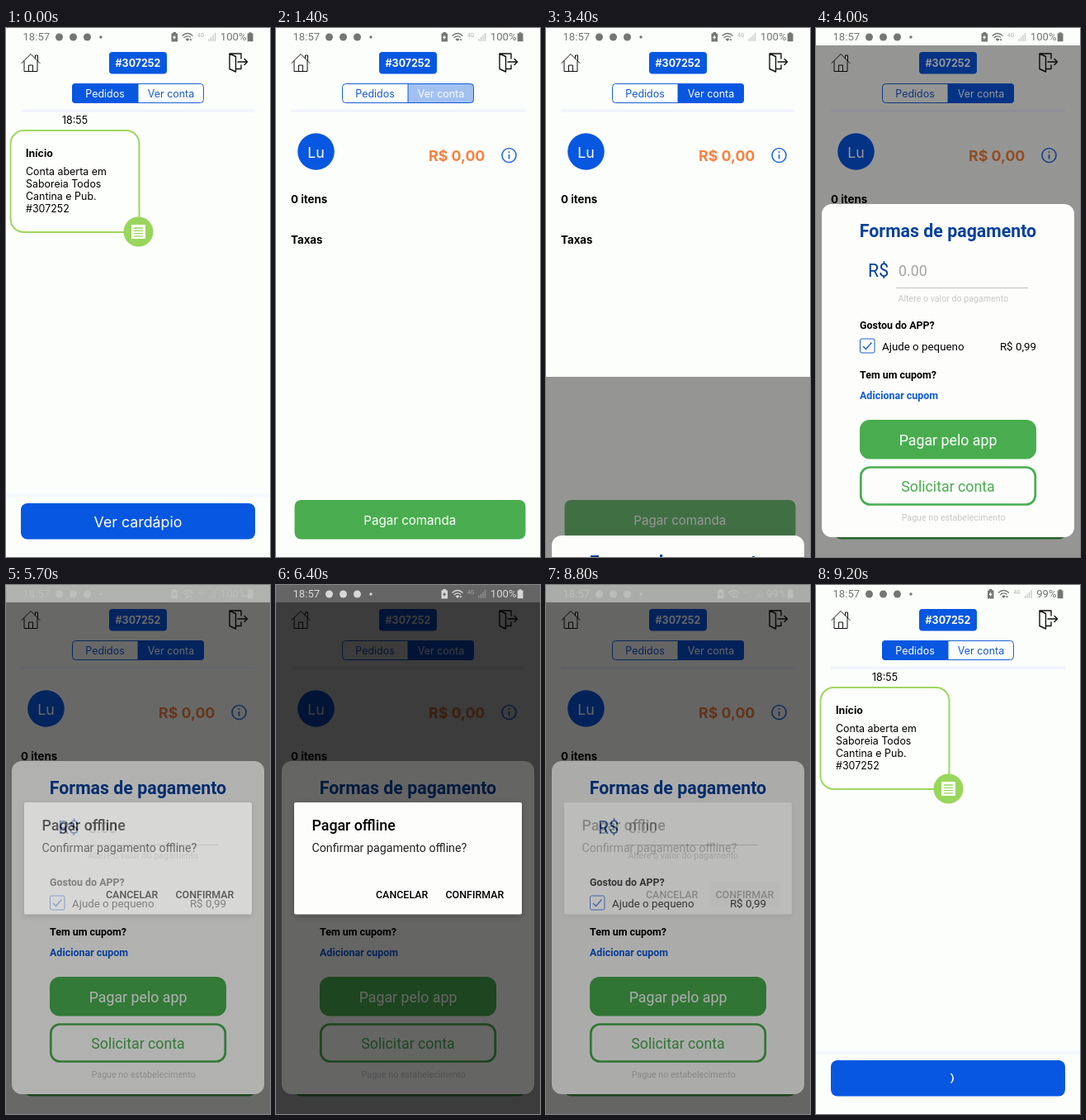
An HTML page for the animation above (9300 ms loop, 320 by 640 pixels).

```html
<!DOCTYPE html>
<html lang="pt-BR">
<head>
<meta charset="utf-8">
<title>Comanda</title>
<style>
html, body { margin: 0; width: 100%; height: 100%; overflow: hidden; background: #fcfefb; }
svg { display: block; width: 320px; height: 640px; }
text { font-family: Inter, sans-serif; font-size: 12.44px; white-space: pre; }
.rb text, text.rb { font-family: Roboto, sans-serif; }
.b { font-weight: 700; }
.m { font-weight: 500; }
.mid { text-anchor: middle; }
.ln { fill: none; stroke: #111; stroke-width: 1; stroke-linejoin: round; stroke-linecap: round; }
</style>
</head>
<body>
<svg viewBox="0 0 320 640" xmlns="http://www.w3.org/2000/svg">
  <rect width="320" height="640" fill="#fcfefb"/>

  <!-- header -->
  <g class="ln">
    <path d="M19 42.5L30 31.5L41 42.5M22 40V52.5H38V40M27.5 52.5V45H32.5V52.5M35.5 36.5V33H38.5V39.5"/>
    <path stroke-width="1.4" d="M271 31L278.5 34.5V53L271 49.5ZM271 31H285V37M285 45V49.5H278.5M281 41H292.5M289 37.5L292.5 41L289 44.5"/>
  </g>
  <rect x="125" y="29" width="70" height="26.5" rx="4" fill="#0757e1"/>
  <text class="b mid" x="160" y="47" fill="#fff">#307252</text>
  <rect x="18" y="98.5" width="284" height="3.5" fill="#f1f4fd"/>

  <!-- segmented control -->
  <rect x="80.5" y="67.5" width="159" height="23" rx="4" fill="#fcfefb" stroke="#1a5fd8"/>
  <path id="segL" d="M160.500 67V91H84a4 4 0 0 1-4-4V71a4 4 0 0 1 4-4Z" fill="#0757e1"/>
  <path id="segMid" d="M160 67V91" stroke="#1a5fd8"/>
  <text id="tabL" class="mid" x="120" y="84">Pedidos</text>
  <g id="segR">
    <path id="segRFill" d="M160 67V91H236a4 4 0 0 0 4-4V71a4 4 0 0 0-4-4Z" fill="#0757e1"/>
    <text id="tabR" class="mid" x="200" y="84">Ver conta</text>
  </g>

  <!-- orders -->
  <g id="orders">
    <text x="68" y="115.700">18:55</text>
    <rect x="5.500" y="124" width="156" height="123" rx="16" fill="#fdfffc" stroke="#9fd75f" stroke-width="2"/>
    <text class="b" x="24" y="156">Início</text>
    <text x="24" y="178">Conta aberta em</text>
    <text x="24" y="193">Saboreia Todos</text>
    <text x="24" y="208">Cantina e Pub.</text>
    <text x="24" y="223">#307252</text>
    <circle cx="160.500" cy="246.500" r="18" fill="#98d65c"/>
    <path d="M152 238H169V255H152Z" fill="#fff"/>
    <path d="M155 242H166M155 245.300H166M155 248.600H166M155 251.800H166" stroke="#98d65c" stroke-width="1.300"/>
    <rect y="563" width="320" height="5" fill="#f5f9fe"/>
    <rect x="18" y="575" width="284" height="43.500" rx="8" fill="#0757e1"/>
    <text id="menu" class="mid" x="160" y="603.500" fill="#fff" style="font-size:17.78px">Ver cardápio</text>
    <path id="spin" d="M163.500 591A7.500 7.500 0 0 1 163.500 602.500" fill="none" stroke="#fff" stroke-width="1.600"/>
  </g>

  <!-- bill -->
  <g id="bill">
    <circle cx="48.500" cy="149.500" r="22.300" fill="#0757e1"/>
    <text class="mid" x="48.500" y="156.500" fill="#fff" style="font-size:17.78px">Lu</text>
    <text class="b" x="185" y="161" fill="#f9803f" style="font-size:17.78px">R$ 0,00</text>
    <circle cx="282.500" cy="154" r="8.500" fill="none" stroke="#2f70e4" stroke-width="1.700"/>
    <path d="M282.500 149.300V151M282.500 153V158.500" stroke="#2f70e4" stroke-width="1.800"/>
    <text class="b" x="18" y="212" style="font-size:13.33px">0 itens</text>
    <text class="b" x="18" y="261" style="font-size:13.33px">Taxas</text>
    <g id="pay">
      <rect x="22.500" y="571" width="280" height="47.500" rx="8" fill="#49ad4f"/>
      <text class="mid" x="162.300" y="600.500" fill="#fff" style="font-size:15.11px">Pagar comanda</text>
    </g>
  </g>

  <!-- payment sheet -->
  <g id="sheet" class="rb">
    <rect y="21" width="320" height="619" opacity=".41"/>
    <rect x="7" y="213" width="306" height="403" rx="12" fill="#fdfefc"/>
    <text class="b mid" x="160" y="253" fill="#07409c" style="font-size:21.33px">Formas de pagamento</text>
    <text x="63" y="301" fill="#07409c" style="font-size:21.33px">R$</text>
    <text x="100" y="300" fill="#a3a5a3" style="font-size:17.78px">0.00</text>
    <path d="M97 314.500H257" stroke="#bfc1bf"/>
    <text x="99.500" y="330.500" fill="#c6c8c6" style="font-size:10.67px">Altere o valor do pagamento</text>
    <text class="b" x="53" y="363.500">Gostou do APP?</text>
    <rect x="53.500" y="376" width="17.500" height="17" rx="2" fill="none" stroke="#1b5ad0"/>
    <path d="M57 385L60.500 388.500L67.500 380.500" fill="none" stroke="#1b5ad0" stroke-width="1.400"/>
    <text x="80" y="389.500" style="font-size:13.33px">Ajude o pequeno</text>
    <text x="267" y="389.500" text-anchor="end" style="font-size:13.33px">R$ 0,99</text>
    <text class="b" x="53" y="424">Tem um cupom?</text>
    <text class="b" x="53" y="449" fill="#0b58d8">Adicionar cupom</text>
    <rect x="53" y="474" width="214" height="47.500" rx="12" fill="#49ad4f"/>
    <text class="mid" x="160" y="504.500" fill="#fff" style="font-size:17.78px">Pagar pelo app</text>
    <rect x="54.300" y="531.500" width="211.500" height="45" rx="11" fill="none" stroke="#49ad4f" stroke-width="2.700"/>
    <text class="mid" x="160" y="560.500" fill="#49ad4f" style="font-size:17.78px">Solicitar conta</text>
    <text class="mid" x="166.700" y="596" fill="#c6c8c6" style="font-size:10.67px">Pague no estabelecimento</text>
  </g>

  <rect id="dim" width="320" height="640"/>

  <!-- status bar -->
  <g id="status" class="rb">
    <text x="20.500" y="15" style="font-size:13.1px">18:57</text>
    <circle cx="64.500" cy="11" r="4.500"/>
    <circle cx="81.500" cy="11" r="4.500"/>
    <circle cx="98.500" cy="11" r="4.500"/>
    <circle cx="115" cy="11" r="1.700"/>
    <g id="signals">
      <path fill-rule="evenodd" d="M202.500 5H206V6.500H208V16.500H200.500V6.500H202.500ZM204.200 8.500L202 12H203.500V14L206.500 10.800H204.800Z"/>
      <path d="M213.500 9.500Q220 3.500 226.500 9.500M215.500 12Q220 8 224 11.500" fill="none" stroke="currentColor" stroke-width="1.300"/>
      <path d="M217.500 13.500Q220 11.500 222.500 13.500L220 16Z"/>
      <path d="M224 12.500L225.500 15H222.500Z"/>
      <text x="232" y="10.500" opacity=".6" style="font-size:6.500px">4G</text>
      <path d="M246 13V16M248.500 11V16M251 8.500V16M253.500 6V16" stroke="currentColor" stroke-width="1.300" opacity=".4"/>
    </g>
    <text id="charge" x="291.500" y="15" text-anchor="end" style="font-size:13.1px"></text>
    <path d="M294.500 5.200H297.500V6.500H299.500V16.300H292.700V6.500H294.500Z"/>
  </g>

  <!-- confirm dialog -->
  <g id="dialog" class="rb">
    <rect x="22" y="263" width="276" height="135.500" rx="2" fill="#fdfefc" style="filter:drop-shadow(0 2px 3px rgba(0,0,0,.25))"/>
    <rect id="ripple" x="199" y="359" width="85" height="30" rx="2" opacity=".05"/>
    <text class="m" x="43.500" y="297" style="font-size:17.78px">Pagar offline</text>
    <text x="43.500" y="323" fill="#222" style="font-size:14.22px">Confirmar pagamento offline?</text>
    <text class="m" x="121" y="379">CANCELAR</text>
    <text class="m" x="205.500" y="379">CONFIRMAR</text>
  </g>
</svg>
<script>
const LOOP = 9300, STEP = 100, TRAVEL = 619, DIM = 0.6;
const el = id => document.getElementById(id);
const set = (id, name, value) => el(id).setAttribute(name, value);
const show = (id, on) => set(id, 'visibility', on ? 'visible' : 'hidden');
const ramp = (t, a, b) => Math.min(1, Math.max(0, (t - a) / (b - a)));

function draw(t) {
  // tabs
  const onBill = t >= 1300 && t < 9200;
  show('orders', !onBill);
  show('bill', onBill);
  show('segL', !onBill);
  show('segRFill', onBill);
  show('segMid', onBill);
  set('tabL', 'fill', onBill ? '#1559d4' : '#fff');
  set('tabR', 'fill', onBill ? '#fff' : '#1559d4');
  set('segR', 'opacity', onBill ? 0.2 + 0.8 * ramp(t, 1340, 1640) : 1);

  const loading = t >= 9200;
  show('menu', !loading);
  show('spin', loading);

  // pressed button recovers while the sheet opens
  set('pay', 'opacity', t < 3200 ? 1 : 0.6 + 0.4 * ramp(t, 3200, 3600));

  // sheet slides up decelerating, leaves accelerating
  const up = (1 - ramp(t, 3322, 3722)) ** 2;
  const down = ramp(t, 9000, 9200) ** 2;
  set('sheet', 'transform', `translate(0 ${Math.round(TRAVEL * Math.max(up, down))})`);
  show('sheet', t > 3322 && t < 9200);

  // dialog fades over a dimmed screen
  const fade = ramp(t, 5600, 5800);
  const shade = fade * (1 - ramp(t, 8700, 8920));
  set('dim', 'opacity', DIM * shade);
  set('dialog', 'opacity', fade * (1 - ramp(t, 8700, 8826)));
  show('ripple', t >= 8600);

  // status bar
  const ink = shade > 0 ? '#d6d7d6' : '#747674';
  set('status', 'fill', ink);
  set('status', 'color', ink);
  set('status', 'opacity', shade > 0 ? shade ** 1.5 : 1);
  const low = t >= 6700;
  el('charge').textContent = low ? '99%' : '100%';
  set('signals', 'transform', `translate(${low ? 7.5 : 0} 0)`);
}

function tick() {
  const t = performance.now() % LOOP;
  draw(Math.floor(t / STEP) * STEP);
  requestAnimationFrame(tick);
}
tick();
</script>
</body>
</html>
```
